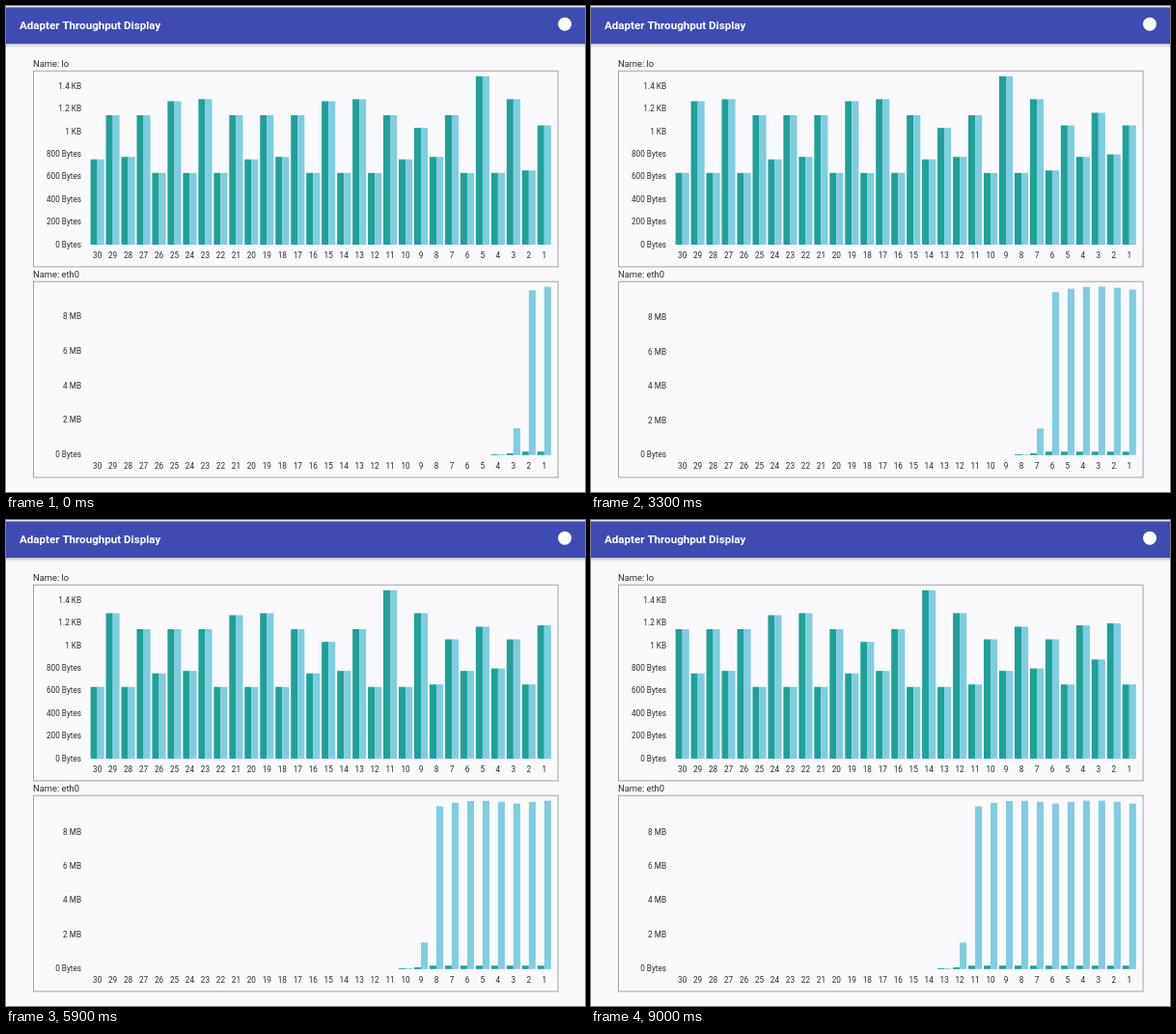
Recreate the animation shown at these times as an HTML page with a canvas. Size 600 px wide and 503 px high, loop 9.1 s.

```html
<!DOCTYPE html>
<html lang="en">
<head>
<meta charset="utf-8">
<title>Adapter Throughput Display</title>
<style>
  html, body { margin: 0; width: 100%; height: 100%; overflow: hidden; background: #faf9fc; }
  canvas { display: block; width: 600px; height: 503px; }
</style>
</head>
<body>
<canvas id="stage" width="600" height="503"></canvas>
<script>
const ctx = document.getElementById('stage').getContext('2d');
const LOOP = 9100, STEP = 1000, FIRST = 300, SLOTS = 30;
const PLOT_X = 87.6, PITCH = 15.97, BAR = 7.05, PLOT_H = 174.3;
const TEAL = '#1fa198', SKY = '#7fcddf', PAPER = '#faf9fc';

// Loopback bytes in second k: a steady poll, a ten-second cycle, a few bursts and lulls
const CYCLE = [120, 511, 142, 511, 0, 635, 0, 653, 0, 511];
const BURSTS = [25, 36], LULLS = [21, 29, 33, 35, 37];
function loopback(k) {
  let v = (k < 28 ? 635 : 657) + CYCLE[k % CYCLE.length];
  if (BURSTS.includes(k)) v += 221;
  if (LULLS.includes(k)) v -= 112;
  return [v, v];
}

// Ethernet MB in second k: a download begins, climbs fast and then hovers
const DOWNLOAD = 26;
function ethernet(k) {
  const n = k - DOWNLOAD, j = n - 2;
  if (n < 0) return [0, 0];
  const level = 9.67 + 0.18 * Math.abs(Math.sin(Math.PI * j / 5)) - 0.16 * Math.exp(-j);
  return [Math.min(0.05 * 2 ** n, 0.2), Math.min(0.05 * 31 ** n, level)];
}

const byteLabel = v => v >= 1000 ? v / 1000 + ' KB' : v + ' Bytes';
const megaLabel = v => v ? v + ' MB' : '0 Bytes';

const charts = [
  { name: 'lo', traffic: loopback, top: 67, base: 247, tick: 200, label: byteLabel },
  { name: 'eth0', traffic: ethernet, top: 285, base: 464.8, tick: 2, label: megaLabel }
];

function text(str, x, y, size, align = 'left', color = '#2b2b2e', weight = 400) {
  ctx.font = `${weight} ${size}px Roboto, "Noto Sans", sans-serif`;
  ctx.textAlign = align;
  ctx.fillStyle = color;
  ctx.fillText(str, x, y);
}

function bar(x, base, h, color) {
  ctx.fillStyle = color;
  ctx.fillRect(x, base - h, BAR, h);
}

function drawHeader() {
  ctx.save();
  ctx.shadowColor = 'rgba(0,0,0,0.35)';
  ctx.shadowBlur = 4;
  ctx.shadowOffsetY = 1.2;
  ctx.fillStyle = '#404bb2';
  ctx.fillRect(-10, 1, 620, 38);
  ctx.restore();
  ctx.fillStyle = '#e9e9f3';
  ctx.fillRect(0, 0, 600, 1.4);
  text('Adapter Throughput Display', 14, 24.2, 11.6, 'left', '#fff', 700);
  ctx.fillStyle = '#fff';
  ctx.beginPath();
  ctx.arc(579, 18.7, 7, 0, Math.PI * 2);
  ctx.fill();
}

function drawChart({ name, traffic, top, base, tick, label }, shift) {
  const rows = Array.from({ length: SLOTS }, (_, i) => traffic(shift + i));
  const max = Math.max(...rows.flat());
  const scale = PLOT_H / max;

  text('Name: ' + name, 28, top - 4.4, 9.4);
  ctx.strokeStyle = '#a3a3a5';
  ctx.lineWidth = 1;
  ctx.strokeRect(28.5, top + 0.2, 543.6, 202.7);

  for (let v = 0; v <= max; v += tick) {
    text(label(v), 78, base - v * scale + 2.5, 8.2, 'right');
  }
  rows.forEach(([sent, got], i) => {
    const x = PLOT_X + i * PITCH;
    bar(x, base, sent * scale, TEAL);
    bar(x + BAR, base, got * scale, SKY);
    text(SLOTS - i, x + BAR, base + 14, 8.2, 'center');
  });
}

function draw(now) {
  const t = now % LOOP;
  const shift = Math.floor((t + STEP - FIRST) / STEP);
  ctx.fillStyle = PAPER;
  ctx.fillRect(0, 0, 600, 503);
  drawHeader();
  charts.forEach(c => drawChart(c, shift));
}

const start = performance.now();
function loop() {
  draw(performance.now() - start);
  requestAnimationFrame(loop);
}
loop();
</script>
</body>
</html>
```
